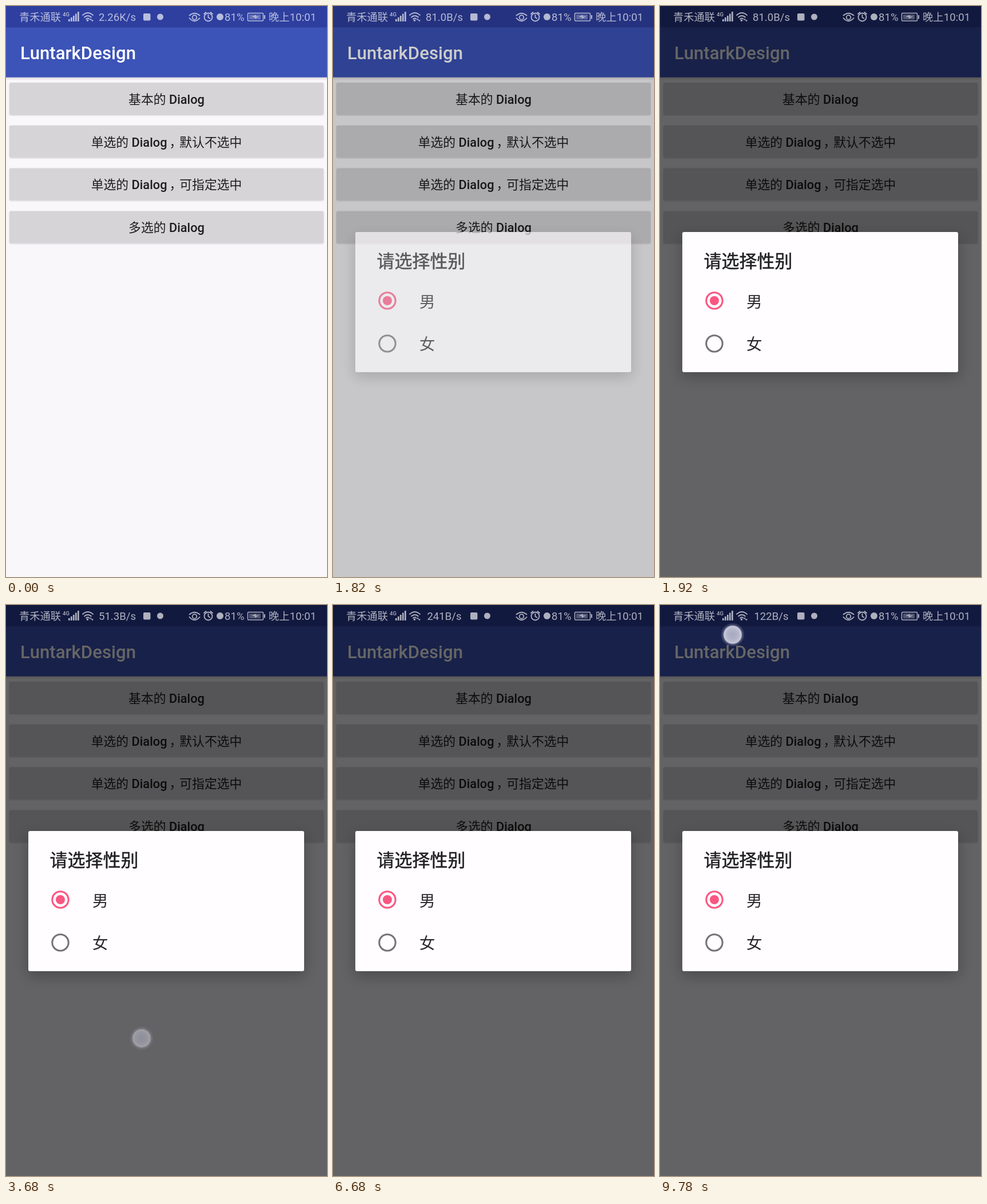
An HTML page that plays this animation: 561x998 px, repeating every 9.83 s.

```html
<!DOCTYPE html>
<html lang="zh-CN">
<head>
<meta charset="utf-8">
<title>Dialog</title>
<style>
  html, body { margin: 0; width: 100%; height: 100%; overflow: hidden; background: #f9f7fa; }
  svg { display: block; width: 100vw; height: 100vh; }
  text { font-family: Roboto, "Noto Sans CJK SC", "Noto Sans CJK", sans-serif; white-space: pre; }
  .cap { font-size: 21.8px; fill: #1d1c1e; text-anchor: middle; }
  .lat { font-weight: 500; }
  .st { font-size: 18.6px; }
  .cn { font-size: 18.3px; }
  .line { fill: none; stroke: #fff; stroke-width: 1.8; }
</style>
</head>
<body>
<svg viewBox="0 0 561 998" preserveAspectRatio="none">
  <defs>
    <linearGradient id="barShade" x2="0" y2="1">
      <stop stop-color="#000" stop-opacity=".13"/>
      <stop offset="1" stop-color="#000" stop-opacity="0"/>
    </linearGradient>
    <radialGradient id="touch">
      <stop stop-color="#c0c3d8" stop-opacity=".84"/>
      <stop offset=".45" stop-color="#ccccde" stop-opacity=".86"/>
      <stop offset=".72" stop-color="#e0e1ec" stop-opacity=".88"/>
      <stop offset=".79" stop-color="#dcddf2" stop-opacity=".3"/>
      <stop offset="1" stop-color="#dcddf2" stop-opacity="0"/>
    </radialGradient>
    <filter id="soft" x="-10%" y="-20%" width="120%" height="140%">
      <feGaussianBlur stdDeviation="12"/>
    </filter>
    <filter id="low" x="-2%" y="-10%" width="104%" height="125%">
      <feDropShadow dx="0" dy=".9" stdDeviation="1.2" flood-opacity=".2"/>
    </filter>
  </defs>

  <rect width="561" height="998" fill="#f9f7fa"/>
  <rect y="124.7" width="561" height="5" fill="url(#barShade)"/>
  <rect width="561" height="124.7" fill="#3c53b7"/>
  <rect width="561" height="37.4" fill="#2e3f9f"/>
  <text class="lat" x="25" y="93" font-size="31.2" fill="#fff">LuntarkDesign</text>
  <g id="buttons"></g>
  <rect id="press" x="6" y="283.600" width="549" height="56" rx="2.5" opacity="0"/>

  <rect id="dim" width="561" height="998" opacity="0"/>

  <g id="dialog" opacity="0">
    <rect x="37" y="404" width="486" height="245" rx="6" opacity=".23" filter="url(#soft)"/>
    <rect x="39" y="395" width="482" height="245" rx="3" fill="#fffdff"/>
    <text x="76.600" y="456.500" font-size="31" fill="#212022" stroke="#212022" stroke-width=".5">请选择性别</text>
    <g fill="none" stroke-width="3.1">
      <circle cx="95" cy="515" r="14.2" stroke="#fa5682"/>
      <circle cx="95" cy="590" r="14.2" stroke="#757376"/>
    </g>
    <circle cx="95" cy="515" r="8" fill="#fa5682"/>
    <g font-size="27.5" fill="#28272a">
      <text x="151" y="526.500">男</text>
      <text x="151" y="601.300">女</text>
    </g>
  </g>

  <g id="status" fill="#fff" opacity=".66">
    <text class="cn" x="23" y="26.3">青禾通联</text>
    <text x="99" y="18" font-size="9.5" font-weight="500">4G</text>
    <g id="bars"></g>
    <g class="line">
      <path d="M133.5 16.5Q143 7.5 152.5 16.5"/>
      <path d="M136.5 20Q143 14 149.5 20"/>
      <path d="M139.5 23.3Q143 20 146 23"/>
    </g>
    <circle cx="142.5" cy="25.3" r="1.7"/>
    <path d="M146 24.5l2-3 2 3zM149 24.5h4l-2 3z"/>
    <text id="speed" class="st" x="194.5" y="26" text-anchor="middle"></text>
    <rect x="240" y="13" width="12.5" height="12.5" rx="2"/>
    <circle cx="269.5" cy="19" r="5.5"/>
    <g class="line">
      <path d="M320 17Q329.5 8.500 339 17M320 20.500Q329.500 32 339 20.500"/>
      <circle cx="329.5" cy="20" r="3.8"/>
      <circle cx="353.5" cy="19.5" r="7"/>
      <path d="M353.5 15v5l3.5 2M345.5 14.5l4.5-4M361.5 14.5l-4.5-4"/>
      <rect x="422.5" y="12.5" width="27" height="13.5" rx="1.5" stroke-width="1.5"/>
    </g>
    <circle cx="374" cy="19" r="6"/>
    <text class="st" x="382" y="26">81%</text>
    <rect x="425" y="15" width="20" height="8.5" opacity=".4"/>
    <path d="M429 19l8-3.5-.5 3 6-.5-8 4.5.5-3z"/>
    <rect x="451" y="16" width="2" height="6.5"/>
    <text class="cn" x="459" y="26.3">晚上</text>
    <text class="st" x="495.8" y="26">10:01</text>
  </g>

  <circle id="dot" r="21" fill="url(#touch)" opacity="0"/>
</svg>

<script>
const LOOP = 9830;
const $ = id => document.getElementById(id);

const captions = [
  ["基本的", ""],
  ["单选的", "默认不选中"],
  ["单选的", "可指定选中"],
  ["多选的", ""]
];
$("buttons").innerHTML = captions.map(([head, tail], i) => {
  const y = 134 + 74.8 * i;
  const rest = tail && `<tspan dx="4">，</tspan><tspan dx="-4">${tail}</tspan>`;
  return `<rect x="6" y="${y}" width="549" height="56" rx="2.5" fill="#d6d4d7" filter="url(#low)"/>` +
    `<text class="cap" x="280.5" y="${y + 36.7}">${head}<tspan class="lat"> Dialog</tspan>${rest}</text>`;
}).join("");

$("bars").innerHTML = [4, 7, 10, 13.5, 17].map((h, i) =>
  `<rect x="${109 + 4 * i}" y="${27 - h}" width="2.7" height="${h}"/>`).join("");

const speeds = [[0, "2.26K/s"], [490, "81.0B/s"], [3540, "51.3B/s"], [6480, "241B/s"], [9480, "122B/s"]];

// start, end, from x, y, to x, y
const taps = [
  [1380, 1700, 330, 314, 330, 314],
  [2410, 2800, 412, 794, 410, 790],
  [2950, 3240, 408.5, 781, 408.5, 781],
  [3540, 3780, 237, 758, 237, 757],
  [3930, 4360, 238, 759, 237, 758],
  [4400, 4810, 237, 757, 237, 757],
  [4960, 5210, 236, 756, 236, 756],
  [8840, 9140, 129, 46, 129, 508],
  [9480, 10200, 127, 52, 127, 52]
];
const FADE = 180;

const fadeIn = [[1720, 0], [1770, .2], [1820, .66], [1870, .93], [1920, 1]];
const dimIn = [[1770, 0], [1820, .2], [1870, .42], [1920, .6]];
const pressed = [[1380, 0], [1450, .04], [1770, .034], [1820, 0]];

// linear value along a list of [time, value]
function track(keys, t) {
  if (t <= keys[0][0]) return keys[0][1];
  for (let i = 1; i < keys.length; i++) {
    const [a, v] = keys[i - 1], [b, w] = keys[i];
    if (t < b) return v + (w - v) * (t - a) / (b - a);
  }
  return keys[keys.length - 1][1];
}

const show = (id, value) => $(id).setAttribute("opacity", value);

function drawDot(t) {
  const tap = taps.find(p => t >= p[0] && t < p[1]);
  if (!tap) return show("dot", 0);
  const [start, end, x0, y0, x1, y1] = tap;
  const k = Math.min(1, (t - start) / (end - start - 40));
  $("dot").setAttribute("cx", x0 + (x1 - x0) * k);
  $("dot").setAttribute("cy", y0 + (y1 - y0) * k);
  show("dot", Math.min(1, (end - t) / FADE));
}

function draw(t) {
  // the dialog opens in 50 ms steps
  const tick = 20 + 50 * Math.floor((t - 20) / 50);
  show("dialog", track(fadeIn, tick));
  show("dim", track(dimIn, tick));
  show("press", track(pressed, tick));
  const label = speeds.filter(s => s[0] <= t).pop()[1];
  if ($("speed").textContent !== label) $("speed").textContent = label;
  drawDot(t);
}

const begin = performance.now();
function loop() {
  draw((performance.now() - begin) % LOOP);
  requestAnimationFrame(loop);
}
loop();
</script>
</body>
</html>
```
